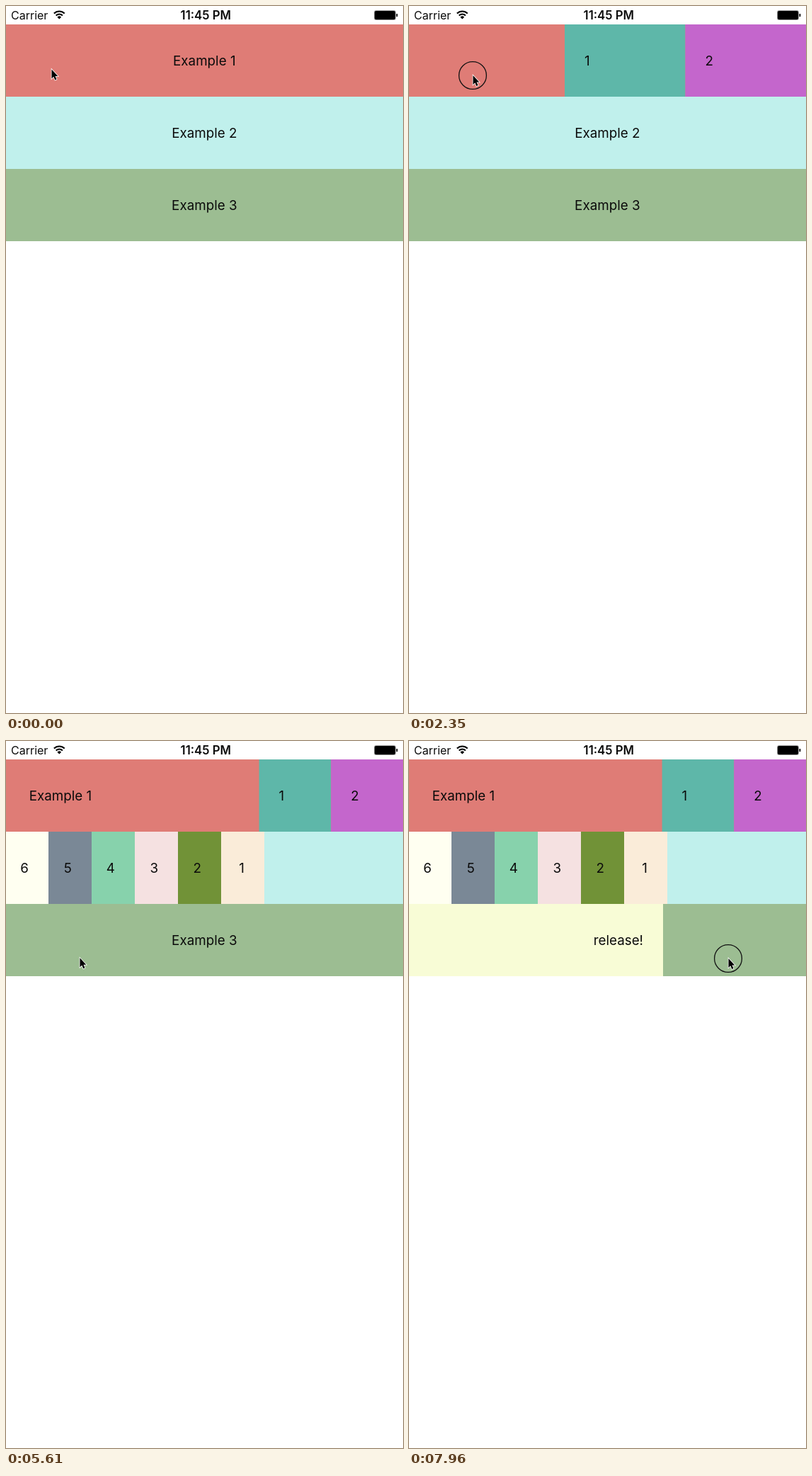
Recreate the animation shown at these times as an HTML page with a canvas. Size 561x998 px, loop 8 s.

```html
<!DOCTYPE html>
<html lang="en">
<head>
<meta charset="utf-8">
<title>Swipe cells</title>
<style>
html, body { margin: 0; width: 100%; height: 100%; overflow: hidden; background: #fff; }
canvas { display: block; }
</style>
</head>
<body>
<canvas id="stage" width="561" height="998"></canvas>
<script>
const WIDTH = 561, HEIGHT = 998, LOOP = 8000;
const TOP = 26, ROW = 102, INSET = 28, BUTTON = 101.7;
const HOLD = 100, SETTLE = 360, HOVER = 800, LAG = 6;
const FONT = 'Inter, "Open Sans", sans-serif';
const ctx = document.getElementById('stage').getContext('2d');

const rows = [
  { label: 'Example 1', color: '#df7c76',
    left: [['Pull action', '#9dcdf0']],
    right: [['1', '#5eb7a9'], ['2', '#c466cc']] },
  { label: 'Example 2', color: '#c0f0ec',
    left: [['6', '#fffff1'], ['5', '#7a8896'], ['4', '#87d2ac'],
           ['3', '#f5e1e1'], ['2', '#719237'], ['1', '#faecd9']] },
  { label: 'Example 3', color: '#9cbd92',
    left: [['release!', '#f8fcd6']] }
];

// A drag swings between two points, "swings" times; the row then settles at "rest".
const drags = [
  { row: 0, start: 230, stroke: 630, swings: 1, from: [120, 92], to: [424, 88.5], rest: 0 },
  { row: 0, start: 1700, stroke: 640, swings: 1, from: [431, 93], to: [90, 98], rest: -2 * BUTTON },
  { row: 1, start: 3470, stroke: 330, swings: 1, from: [33, 216], to: [193, 212], rest: 365 },
  { row: 2, start: 5790, stroke: 715, swings: 3, from: [92, 319], to: [451, 307], rest: 0 }
];
const home = { release: 0, to: [64, 89.5] };
for (const d of drags) d.release = d.start + d.stroke * d.swings + HOLD;

const clamp = (v, low, high) => Math.min(high, Math.max(low, v));
const mix = (a, b, u) => a.map((v, i) => v + (b[i] - v) * u);
const swing = u => (1 - Math.cos(Math.PI * u)) / 2;
const isPressed = (d, t) => t >= d.start && t <= d.release;

function pointerAt(t) {
  const held = drags.find(d => isPressed(d, t));
  if (held) {
    const u = clamp((t - held.start) / held.stroke, 0, held.swings);
    return mix(held.from, held.to, swing(u));
  }
  const last = drags.findLast(d => d.release < t) || home;
  const next = drags.find(d => d.start > t);
  if (!next) return last.to;
  const leave = Math.max(last.release, next.start - HOVER);
  return mix(last.to, next.from, swing(clamp((t - leave) / (next.start - leave), 0, 1)));
}

function offsetAt(row, t) {
  const drag = drags.findLast(d => d.row === row && d.start + LAG <= t);
  if (!drag) return 0;
  const pulled = pointerAt(Math.min(t - LAG, drag.release))[0] - drag.from[0];
  const remaining = 1 - clamp((t - drag.release) / SETTLE, 0, 1);
  return drag.rest + (pulled - drag.rest) * remaining ** 3;
}

function text(string, x, y, align, size = 18.8, weight = 400) {
  ctx.font = `${weight} ${size}px ${FONT}`;
  ctx.textAlign = align;
  ctx.fillStyle = '#0b0b0b';
  ctx.fillText(string, x, y);
}

function drawAction([label, color], x, y, width, align) {
  ctx.fillStyle = color;
  ctx.fillRect(x, y, width, ROW);
  text(label, align === 'left' ? x + INSET : x + width - INSET, y + 58, align);
}

function drawRow(row, index, t) {
  const y = TOP + index * ROW, offset = offsetAt(index, t);
  ctx.save();
  ctx.beginPath();
  ctx.rect(0, y, WIDTH, ROW);
  ctx.clip();
  ctx.fillStyle = row.color;
  ctx.fillRect(0, y, WIDTH, ROW);
  text(row.label, 280.3 + offset, y + 58, 'center');
  if (offset > 0) {
    const edge = Math.round(offset), count = row.left.length;
    const width = Math.ceil(edge / count);
    row.left.forEach((action, i) => drawAction(action, edge - (count - i) * width, y, width, 'right'));
  } else if (offset < 0 && row.right) {
    const width = -offset / row.right.length;
    row.right.forEach((action, i) => drawAction(action, WIDTH + offset + i * width, y, width, 'left'));
  }
  ctx.restore();
}

function drawStatusBar() {
  text('Carrier', 7, 19, 'left', 16);
  text('11:45 PM', 282.3, 19, 'center', 16.8, 600);
  ctx.strokeStyle = ctx.fillStyle = '#000';
  ctx.lineWidth = 2.2;
  for (const radius of [10.5, 6.5]) {
    ctx.beginPath();
    ctx.arc(75.3, 18, radius, -Math.PI * 0.75, -Math.PI * 0.25);
    ctx.stroke();
  }
  ctx.beginPath();
  ctx.moveTo(75.3, 18.5);
  ctx.arc(75.3, 18.5, 4, -Math.PI * 0.75, -Math.PI * 0.25);
  ctx.fill();
  ctx.beginPath();
  ctx.roundRect(521, 7, 29, 12, 1);
  ctx.fill();
  ctx.strokeStyle = '#999';
  ctx.lineWidth = 1;
  ctx.beginPath();
  ctx.roundRect(520.5, 6.5, 30, 13, 2);
  ctx.stroke();
  ctx.fillRect(551.5, 11, 1.8, 4);
}

function drawPointer(t) {
  ctx.save();
  ctx.translate(...pointerAt(t));
  if (drags.some(d => isPressed(d, t))) {
    ctx.strokeStyle = '#111';
    ctx.lineWidth = 1.3;
    ctx.beginPath();
    ctx.arc(0, 0, 19.4, 0, Math.PI * 2);
    ctx.stroke();
  }
  const arrow = new Path2D('M0.5 0V13L3.3 10.3 5.3 15 7.5 14 5.5 9.5H9.3Z');
  ctx.strokeStyle = '#fff';
  ctx.lineWidth = 1.5;
  ctx.stroke(arrow);
  ctx.fillStyle = '#000';
  ctx.fill(arrow);
  ctx.restore();
}

function draw() {
  const t = performance.now() % LOOP;
  ctx.fillStyle = '#fff';
  ctx.fillRect(0, 0, WIDTH, HEIGHT);
  drawStatusBar();
  rows.forEach((row, i) => drawRow(row, i, t));
  drawPointer(t);
  requestAnimationFrame(draw);
}
draw();
</script>
</body>
</html>
```
